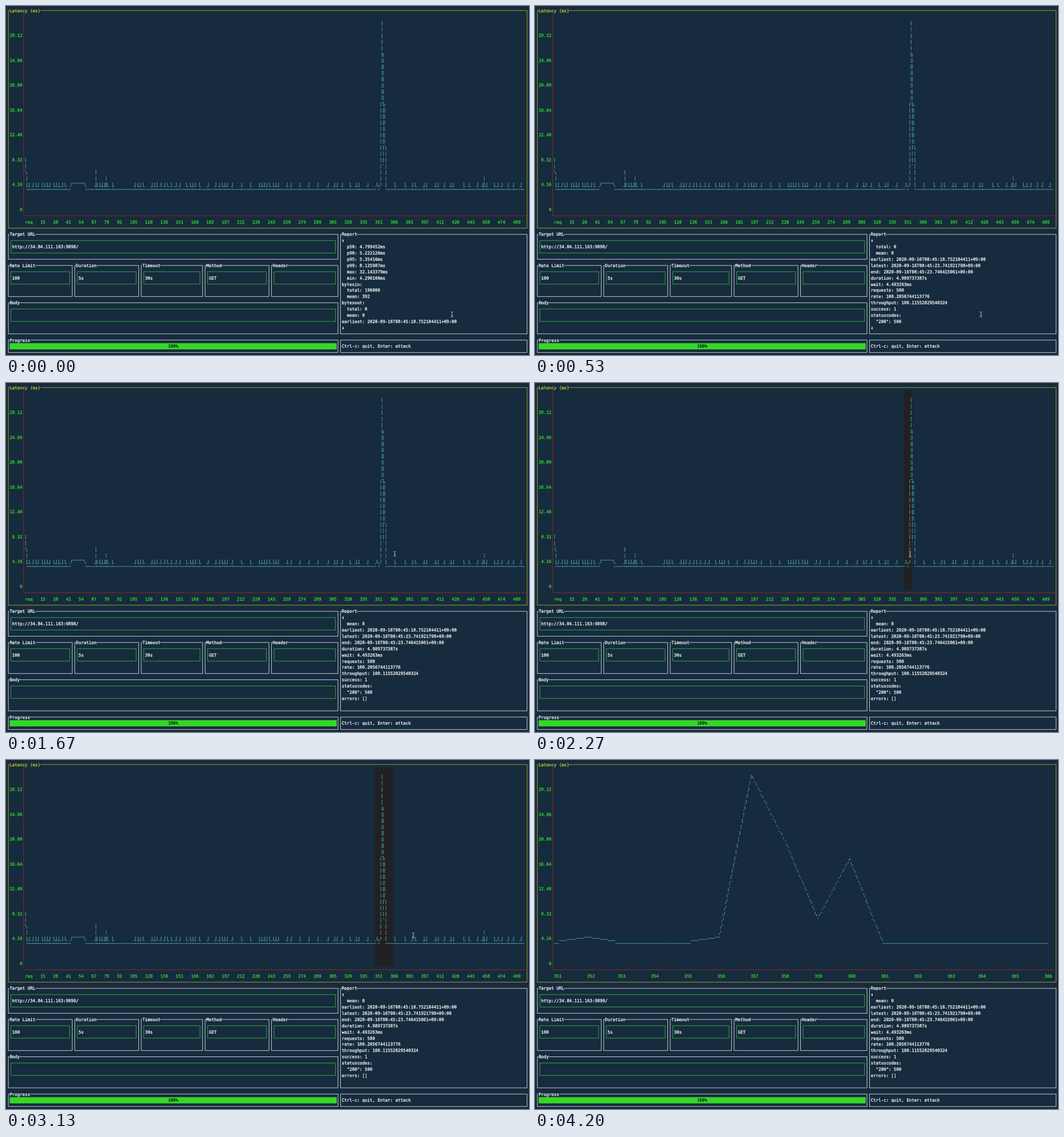
Animation, 917 px wide and 611 px high, one loop 4.83 s. Source, as an HTML page:

```html
<!DOCTYPE html>
<html lang="en">
<head>
<meta charset="utf-8">
<title>Load test dashboard</title>
<style>
html, body { margin: 0; width: 100%; height: 100%; overflow: hidden; background: #162b3d; }
svg { display: block; width: 917px; height: 611px; }
text {
  font: 7.44px "DejaVu Sans Mono", monospace;
  text-rendering: geometricPrecision;
  white-space: pre;
  stroke-width: .3px;
}
</style>
</head>
<body>
<svg id="stage" viewBox="0 0 917 611"></svg>
<script>
const CW = 4.48, CH = 10.886, X0 = 1.9, Y0 = 7.9, LOOP = 4830;
const BG = '#162b3d', WHITE = '#f4f6f7', LINE = '#c3cad0', GREEN = '#35d32f',
      BOX = '#2fa53c', YELLOW = '#c9c527', GOLD = '#a3a020', RED = '#8e2927', CYAN = '#5dbac0';
const stage = document.getElementById('stage');
const left = c => X0 + c * CW;
const midX = c => left(c) + CW / 2;
const midY = r => Y0 + r * CH;

function add(tag, attrs, parent = stage) {
  const el = document.createElementNS('http://www.w3.org/2000/svg', tag);
  for (const k in attrs) el.setAttribute(k, attrs[k]);
  parent.appendChild(el);
  return el;
}
function write(str, col, row, color = WHITE, parent = stage) {
  const el = add('text', { x: left(col), y: midY(row) + 2.7, fill: color, stroke: color }, parent);
  el.textContent = str;
  return el;
}
function fill(x, y, width, height, color) {
  return add('rect', { x, y, width, height, fill: color });
}
function frame(c0, r0, c1, r1, color) {
  add('rect', { x: midX(c0), y: midY(r0), width: (c1 - c0) * CW, height: (r1 - r0) * CH,
    fill: 'none', stroke: color, 'stroke-width': 1 });
}
function panel(title, c0, r0, c1, r1, color = LINE, ink = WHITE) {
  frame(c0, r0, c1, r1, color);
  if (!title) return;
  fill(left(c0 + 1), midY(r0) - 5, title.length * CW, 10, BG);
  write(title, c0 + 1, r0, ink);
}
function field(title, c0, r0, c1, r1, value) {
  panel(title, c0, r0, c1, r1);
  frame(c0 + 1, r0 + 1, c1 - 1, r0 + 3, BOX);
  write(value, c0 + 2, r0 + 2);
}

// Braille style line: two dots across and four down in each cell
function plot(points, parent) {
  let d = '';
  const dot = (x, y) => {
    const px = left(7) + 1.15 + x * CW / 2;
    const py = midY(1 + (y >> 2)) + .6 + (y % 4) * 2 - 3;
    d += `M${(px - .55).toFixed(2)} ${(py - .7).toFixed(2)}h1.1v1.4h-1.1z`;
  };
  for (let i = 1; i < points.length; i++) {
    const [xa, ya] = points[i - 1], [xb, yb] = points[i];
    const n = Math.max(Math.abs(xb - xa), Math.abs(yb - ya), 1);
    for (let k = 0; k <= n; k++)
      dot(Math.round(xa + (xb - xa) * k / n), Math.round(ya + (yb - ya) * k / n));
  }
  add('path', { d, fill: CYAN }, parent);
}

// Static panels
panel('Latency (ms)', 0, 0, 203, 35, GOLD, YELLOW);
field('Target URL', 0, 36, 129, 40, 'http://34.84.111.163:9898/');
field('Rate Limit', 0, 41, 25, 46, '100');
field('Duration', 26, 41, 51, 46, '5s');
field('Timeout', 52, 41, 76, 46, '30s');
field('Method', 77, 41, 102, 46, 'GET');
field('Header', 103, 41, 129, 46, '');
field('Body', 0, 47, 129, 52, '');
panel('Progress', 0, 53, 129, 55);
fill(left(1), midY(54) - CH / 2, 128 * CW, CH, '#35d728');
write('100%', 63, 54, '#10231a');
panel('Report', 130, 36, 203, 52);
panel('', 130, 53, 203, 55);
write('Ctrl-c: quit, Enter: attack', 131, 54);

// Chart axes
const marker = fill(left(144), midY(1) - CH / 2, 0, 32 * CH, '#212121');
add('path', { d: `M${midX(6)} ${midY(1) - CH / 2}V${midY(33)}H${left(203)}`,
  fill: 'none', stroke: RED, 'stroke-width': 1 });
for (let i = 0; i < 8; i++) {
  const label = i ? (4.16 * i).toFixed(2) : '0';
  write(label, 6 - label.length, 32 - 4 * i, GREEN);
}

// Requests 351 to 366: offset and dot row at each bend
const BASE = 112, PEAK = 108;
const bends = [[0, BASE], [1, PEAK], [2, BASE], [4, BASE], [5, PEAK], [6, 4], [7, 46],
  [8, 96], [9, 58], [10, BASE], [15, BASE]];
const zoom = add('g', {});
for (let i = 0; i < 16; i++)
  write(String(351 + i), 7 + Math.floor(12.82 * i + .2), 34, GREEN, zoom);
plot(bends.map(([i, y]) => [Math.round(i * 25.7), y]), zoom);

// Whole run: base line, spike and small random blips
const wide = add('g', {});
write('req', 7, 34, GREEN, wide);
for (let c = 13; c < 203; c += c < 48 ? 5 : 6)
  write(String(Math.round(2.56 * (c - 7))), c, 34, GREEN, wide);
plot([[0, 92], [1, BASE], [35, BASE], [36, PEAK], [46, PEAK], [47, BASE],
  ...bends.map(([i, y]) => [Math.round((351 + i) / 1.28), y]), [390, BASE]], wide);

let seed = 7;
const random = () => (seed = seed * 16807 % 2147483647) / 2147483647;
function blip(x, top = PEAK) {
  const foot = x + (random() < .65 ? -1 : 1);
  plot([[x, BASE], [x, top], [x, BASE - 1], [foot, BASE - 1]], wide);
}
const quiet = x => [[34, 54], [69, 83], [272, 288]].some(([a, b]) => x >= a && x <= b);
for (let x = 3; x < 389; x += 2 + Math.floor(x < 34 ? 1.5 * random() : 7 * random() ** 2))
  if (!quiet(x)) blip(x);
blip(55, 100);
blip(63, 104);
blip(359, 104);

// Report list
const report = `  p50: 4.799452ms
  p90: 5.222126ms
  p95: 5.35416ms
  p99: 8.125987ms
  max: 32.143379ms
  min: 4.290108ms
bytesin:
  total: 196000
  mean: 392
bytesout:
  total: 0
  mean: 0
earliest: 2020-09-16T08:45:18.752184411+09:00
latest: 2020-09-16T08:45:23.741921798+09:00
end: 2020-09-16T08:45:23.746415061+09:00
duration: 4.989737387s
wait: 4.493263ms
requests: 500
rate: 100.2056744113776
throughput: 100.11552029540324
success: 1
statuscodes:
  "200": 500
errors: []`.split('\n');
write('⇧', 131, 37);
const rows = Array.from({ length: 13 }, (_, i) => write('', 131, 38 + i));
const more = write('⇩', 131, 51);

const pointer = add('path', {
  d: 'M-2.3 -4.5Q-.3 -4.5 0 -3.3Q.3 -4.5 2.3 -4.5M0 -3.3V3.3M-2.3 4.5Q-.3 4.5 0 3.3Q.3 4.5 2.3 4.5M-1.2 1.4H1.2',
  fill: 'none', stroke: '#c4c8c8', 'stroke-width': .9 });

// Pointer path: time, x, y
const path = [[0, 782, 540], [1000, 782, 540], [1430, 688, 299], [1600, 688, 299],
  [2030, 649, 300], [2070, 649, 300], [2570, 671, 300], [2850, 677, 301],
  [3130, 714, 307], [3500, 745, 312], [LOOP, 745, 312]];
function pointerAt(t) {
  const i = path.findIndex(p => p[0] > t);
  const [ta, xa, ya] = path[i - 1], [tb, xb, yb] = path[i];
  const k = (t - ta) / (tb - ta);
  return [xa + (xb - xa) * k, ya + (yb - ya) * k];
}

const ZOOM_AT = 3300;
let shown = -1;
function draw(t) {
  const top = t < 30 ? 0 : t < 570 ? Math.min(10, 1 + Math.floor((t - 30) / 52)) : 11;
  if (top !== shown) {
    rows.forEach((el, i) => { el.textContent = report[top + i]; });
    more.setAttribute('visibility', top < 11 ? 'visible' : 'hidden');
    shown = top;
  }
  const zoomed = t >= ZOOM_AT;
  wide.setAttribute('display', zoomed ? 'none' : 'inline');
  zoom.setAttribute('display', zoomed ? 'inline' : 'none');
  const [x, y] = pointerAt(t);
  pointer.setAttribute('transform', `translate(${x.toFixed(2)} ${y.toFixed(2)})`);
  pointer.setAttribute('visibility', t < 4000 ? 'visible' : 'hidden');
  const cols = t < 2070 || zoomed ? 0 : Math.min(150, Math.floor((x - X0) / CW)) - 143;
  marker.setAttribute('width', cols * CW);
}
const start = performance.now();
function tick() {
  draw((performance.now() - start) % LOOP);
  requestAnimationFrame(tick);
}
draw(0);
requestAnimationFrame(tick);
</script>
</body>
</html>
```
